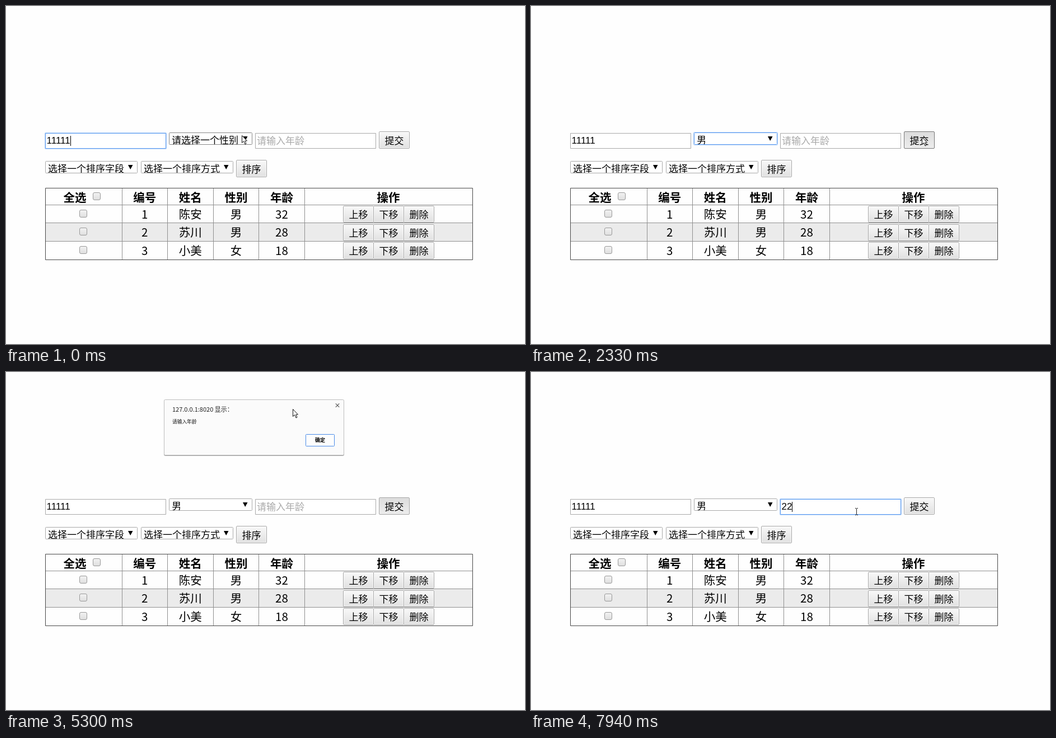
Recreate the animation shown at these times as an HTML page with a canvas. Size 927 px wide and 604 px high, loop 8000 ms.

```html
<!DOCTYPE html>
<html lang="zh-CN">
<head>
<meta charset="utf-8">
<title>表格</title>
<style>
html, body { margin: 0; width: 100%; height: 100%; overflow: hidden; background: #fefefe; }
canvas { display: block; }
</style>
</head>
<body>
<canvas id="stage" width="927" height="604"></canvas>
<script>
const c = document.getElementById('stage').getContext('2d');
const CJK = '"Noto Sans CJK SC", "Noto Sans CJK", sans-serif';
const ARIAL = '"Liberation Sans", "Noto Sans CJK SC", sans-serif';
const GRAY = '#a9a9a9', BLUE = '#5b9bf0', GLOW = 'rgba(91,155,240,.4)';
const LOOP = 8000, STEP = 135;
const COL = 81.6, ROW = 32.6;

// When things happen, in ms
const at = { open: 120, pick: 805, hover: 1210, press: 2330, blur: 2460, alert: 2600,
  leave: 3740, drag: 4300, drop: 4720, close: 6600, focus: 7280, type: 7610 };

// Pointer moves: start, end, and where it comes to rest
const moves = [
  [at.open, 650, 340, 274],
  [at.pick, 1080, 670, 240],
  [at.hover, 1480, 693, 238],
  [1930, at.press, 698, 234],
  [at.alert, 2870, 691, 229],
  [3020, 3290, 572, 47],
  [at.leave, 4160, 517, -12],
  [at.drag, 4570, 506, 60],
  [5150, 6080, 548, 98],
  [6200, 7140, 581, 249],
];

function pointerAt(t) {
  let x = 421, y = 231;
  for (const [a, b, tx, ty] of moves) {
    if (t < a) break;
    const k = Math.min(1, Math.floor((t - a + 20) / STEP) * STEP / (b - a));
    x += (tx - x) * k;
    y += (ty - y) * k;
  }
  return [Math.round(x), Math.round(y)];
}

function rect(x, y, w, h, fill) {
  c.fillStyle = fill;
  c.fillRect(x, y, w, h);
}

function frame(x, y, w, h, color, fill, r = 0) {
  c.beginPath();
  c.roundRect(x + .5, y + .5, w - 1, h - 1, r);
  if (fill) { c.fillStyle = fill; c.fill(); }
  c.strokeStyle = color;
  c.lineWidth = 1;
  c.stroke();
}

// y is the middle of the glyphs
function text(s, x, y, size, { align = 'left', color = '#000', weight = 400, font = CJK } = {}) {
  c.font = `${weight} ${size}px ${font}`;
  c.textAlign = align;
  c.fillStyle = color;
  c.fillText(s, x, Math.round(y + size * (font === ARIAL ? .36 : .38)));
}

function poly(points, fill, stroke) {
  c.beginPath();
  points.forEach(p => c.lineTo(...p));
  c.closePath();
  c.fillStyle = fill;
  c.fill();
  if (stroke) { c.strokeStyle = stroke; c.lineWidth = 1; c.stroke(); }
}

function shade(y, h, top, bottom) {
  const g = c.createLinearGradient(0, y, 0, y + h);
  g.addColorStop(0, top);
  g.addColorStop(1, bottom);
  return g;
}

function button(label, x, y, w, h, { hover, pressed } = {}) {
  const fill = pressed ? shade(y, h, '#dcdcdc', '#ededed') : shade(y, h, '#f9f9f9', '#e0e0e0');
  frame(x, y, w, h, hover ? '#777' : '#a6a6a6', fill, 1.5);
  if (!pressed) frame(x + 1, y + 1, w - 2, h - 2, 'rgba(255,255,255,.6)');
  text(label, x + w / 2, y + h / 2 + 1, 17, { align: 'center' });
}

function field(x, value, hint, focus) {
  frame(x, 227, 216, 28, focus ? BLUE : GRAY, '#fff');
  if (focus) frame(x - 1, 226, 218, 30, GLOW, null, 1);
  if (value) text(value, x + 2.5, 240, 17, { font: ARIAL });
  else text(hint, x + 3, 241, 17, { color: GRAY });
  if (focus) rect(Math.round(x + 2.5 + (value ? c.measureText(value).width : 0)), 232, 1, 18, '#000');
}

function select(label, x, y, w, focus, hover) {
  frame(x, y, w, 22, focus ? BLUE : hover ? '#888' : GRAY, '#fff', 1);
  if (focus) frame(x - 1, y - 1, w + 2, 24, GLOW, null, 1);
  c.save();
  c.beginPath();
  c.rect(x + 1, y + 1, w - 2, 20);
  c.clip();
  text(label, x + 5, y + 14, 17);
  c.restore();
  const ax = x + w - 13;
  poly([[ax - 4, y + 7], [ax + 4.5, y + 7], [ax + .2, y + 15]], '#000');
}

function checkbox(x, y) {
  frame(x - 7, y - 7, 14, 14, '#999', shade(y - 7, 14, '#f3f3f3', '#dedede'), 2.5);
}

function menu(row) {
  frame(291, 248, 149, 71, '#6ea5e8', '#fff');
  rect(292, 249 + row * 24, 134, row > 1 ? 21 : 24, '#1e90ff');
  ['请选择一个性别', '男', '女'].forEach((s, i) =>
    text(s, 297, 261 + i * 24, 17, { color: i === row ? '#fff' : '#000' }));
  rect(427, 249, 12, 69, '#f1f1f1');
  rect(428, 261, 9, 44, '#c1c1c1');
  poly([[430, 257], [435, 257], [432.5, 254]], '#a3a3a3');
  poly([[430, 311], [435, 311], [432.5, 314]], '#505050');
}

function table() {
  const bold = { align: 'center', weight: 700 };
  const colX = i => 247.7 + i * COL;
  rect(70, 388, 764, 32, '#ebebeb');
  for (let i = 0; i < 5; i++) rect(Math.floor(207 + i * COL), 326, 1, 127, '#909090');
  for (let r = 0; r < 3; r++) rect(70, Math.floor(355 + r * ROW), 764, 1, '#909090');
  frame(70, 325, 764, 129, '#484848');

  text('全选', 123, 342, 20.5, bold);
  checkbox(162, 340);
  ['编号', '姓名', '性别', '年龄'].forEach((s, i) => text(s, colX(i), 342, 20.5, bold));
  text('操作', 683, 342, 20.5, bold);

  const people = ['1 陈安 男 32', '2 苏川 男 28', '3 小美 女 18'];
  people.forEach((person, r) => {
    const y = 372 + r * ROW;
    checkbox(138, Math.round(y - 1.3));
    person.split(' ').forEach((s, i) => text(s, colX(i), y, 20.5, { align: 'center' }));
    ['上移', '下移', '删除'].forEach((s, i) =>
      button(s, 602 + i * 54, Math.round(y - 15), 55, 30));
  });
}

function dialog(x, y) {
  frame(x, y + 1, 322, 100, '#a8a8a8', '#a8a8a8', 2);
  frame(x, y, 322, 100, '#bdbdbd', '#fbfbfb', 2);
  text('127.0.0.1:8020 显示：', x + 15, y + 18, 11, { color: '#222' });
  text('请输入年龄', x + 15, y + 40, 8.7, { color: '#111' });
  text('×', x + 310, y + 11, 11, { align: 'center', color: '#555', weight: 700 });
  frame(x + 253, y + 62, 52, 22, '#4a8be8', '#fdfdfd', 1);
  text('确定', x + 279, y + 73, 9, { align: 'center', weight: 700 });
}

function pointer(x, y) {
  const inField = y >= 228 && y <= 254 && (x > 445 && x < 661 || x > 70 && x < 285);
  if (inField) {
    rect(x, y - 5, 1, 11, '#222');
    [-6, 6].forEach(d => { rect(x - 2, y + d, 2, 1, '#222'); rect(x + 1, y + d, 2, 1, '#222'); });
    return;
  }
  const shape = [[0, 0], [0, 13], [3, 10], [5.5, 15.5], [7.5, 14.5], [5.3, 9.5], [9, 9.5]];
  poly(shape.map(([a, b]) => [x + a + .5, y + b + .5]), '#fff', '#111');
}

function draw(now) {
  const t = now % LOOP;
  const during = (a, b) => t >= a && t < b;
  const [x, y] = pointerAt(t);
  const typed = Math.max(0, Math.min(2, Math.ceil((t - at.type) / 165)));

  rect(0, 0, 927, 604, '#fefefe');
  field(70, '11111', '', t < at.open);
  select(t < at.pick ? '请选择一个性别' : '男', 291, 226, 149, during(at.open, at.blur), t < at.open);
  field(445, '22'.slice(0, typed), '请输入年龄', t >= at.focus);
  button('提交', 666, 224, 55, 31,
    { hover: during(at.hover, at.blur), pressed: during(at.press, at.close) });
  select('选择一个排序字段', 70, 277, 165);
  select('选择一个排序方式', 241, 277, 165);
  button('排序', 411, 275, 55, 31);
  table();

  if (during(at.open, at.pick)) menu(Math.max(0, Math.min(2, Math.floor((y - 249) / 24))));
  if (during(at.alert, at.drop)) dialog(297, -51);
  if (during(at.drop, at.close)) dialog(282, 49);
  if (during(at.drag, at.drop)) frame(x - 226, y - 14, 327, 106, '#111');
  if (!during(at.leave, at.drag)) pointer(x, y);
}

let start;
function tick(now) {
  start ??= now;
  draw(now - start);
  requestAnimationFrame(tick);
}
draw(0);
requestAnimationFrame(tick);
</script>
</body>
</html>
```
